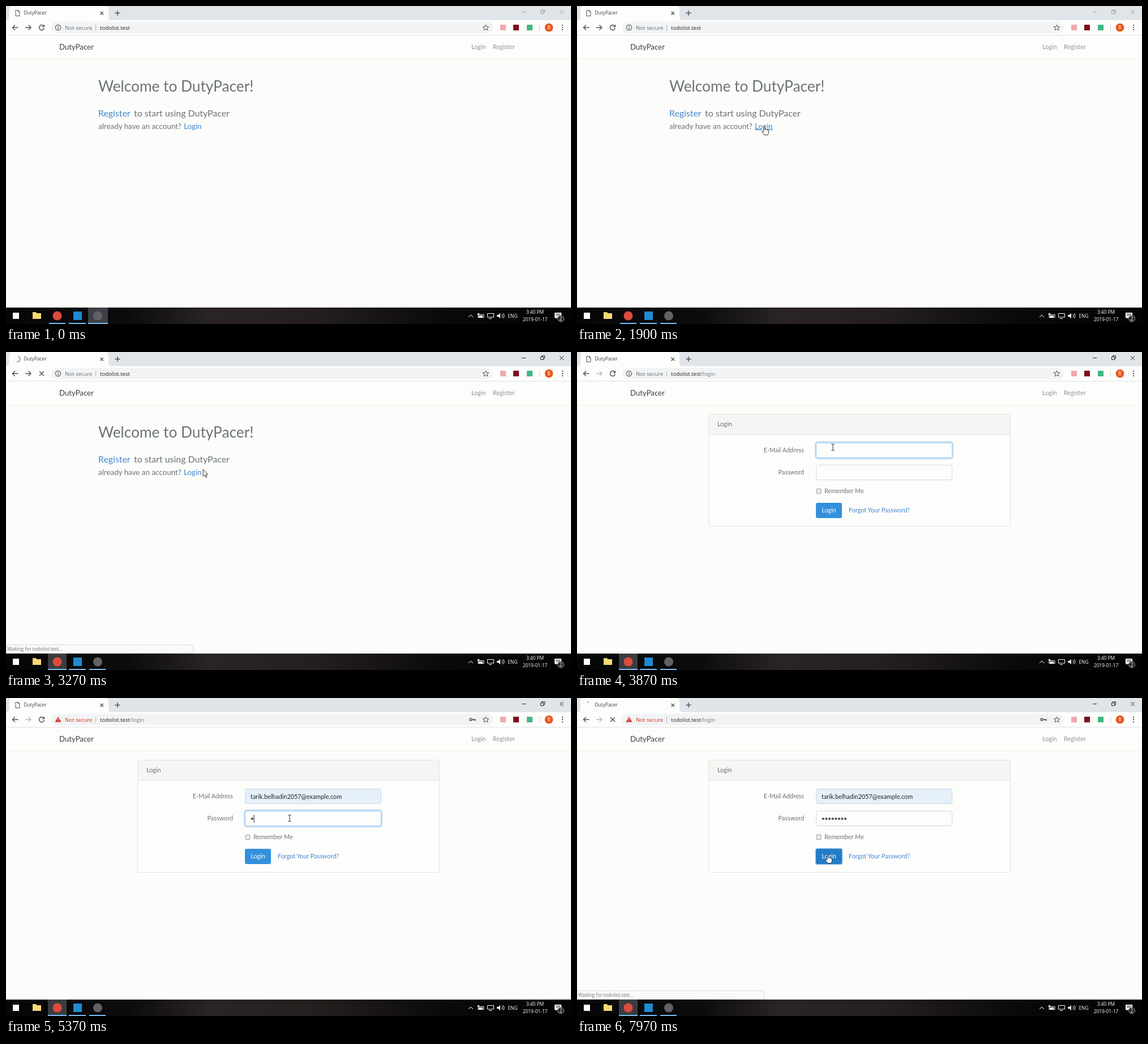
Recreate the animation shown at these times as an HTML page. Size 998x561 px, loop 8000 ms.

```html
<!DOCTYPE html>
<html lang="en">
<head>
<meta charset="utf-8">
<title>DutyPacer</title>
<style>
html, body { margin: 0; width: 100%; height: 100%; overflow: hidden; background: #fff; }
svg { display: block; }
text { font: 8.4px "Open Sans", "Noto Sans", sans-serif; fill: #3c4043; }
.url text { font-size: 9.6px; }
.page text { font: 10.85px Lato, sans-serif; fill: #6a7276; }
.page .h1 { font-size: 26.25px; }
.page .h4 { font-size: 15.9px; }
.page .h5 { font-size: 13.4px; }
.page .brand { font-size: 13.2px; fill: #3b3f42; }
.page .nav { fill: #8d9295; }
.page .link { fill: #4287cb; }
.page .mail { fill: #222; }
.line { fill: none; stroke: #4d5156; stroke-width: 1.4; }
.thin { fill: none; stroke-width: 1; }
.tray text { fill: #fff; }
</style>
</head>
<body>
<svg width="998" height="561" viewBox="0 0 998 561">
  <defs>
    <linearGradient id="bar">
      <stop offset="0" stop-color="#050607"/><stop offset=".22" stop-color="#0d0c0c"/>
      <stop offset=".36" stop-color="#2a2424"/><stop offset=".55" stop-color="#241f1e"/>
      <stop offset=".78" stop-color="#0a0909"/><stop offset="1" stop-color="#030303"/>
    </linearGradient>
  </defs>

  <!-- Browser frame -->
  <rect width="998" height="26" fill="#e0e5e9"/>
  <path d="M0 25Q6 25 6 19V6Q6 0 12 0H175Q181 0 181 6V19Q181 25 187 25Z" fill="#fdfdfc"/>
  <rect y="25" width="998" height="27" fill="#fdfdfc"/>
  <path id="file" d="M17 7.5H21.500L24 10V17.500H17ZM21.500 7.500V10H24" class="line" style="stroke-width:1"/>
  <path id="spin" class="line" style="stroke:#85898d"/>
  <text x="31.500" y="15.300">DutyPacer</text>
  <path d="M166.500 10l5.500 5.500m0-5.500l-5.500 5.500M192.500 12.500h9m-4.500-4.500v9" class="line"/>
  <path id="win" d="M911 10.500h7M944.500 8.500h5v5h-5zM946.500 8.500v-2h5v5h-2M978 7l7 7m0-7l-7 7" class="thin"/>
  <path d="M21.500 38H11.500m4.500-4.500L11.500 38l4.500 4.500" class="line"/>
  <path id="fwd" d="M34 38H44m-4.500-4.500L44 38l-4.500 4.500" class="line"/>
  <path id="reload" d="M66.500 35A4.500 4.500 0 1 0 67.500 39M67.500 33V36.500H64" class="line"/>
  <path id="stop" d="M59 34l8 8m0-8l-8 8" class="line"/>
  <rect x="80" y="28" width="780" height="20" rx="10" fill="#f1f3f4"/>
  <g class="url">
    <g id="info"><circle cx="92" cy="38" r="4.600" class="line" style="stroke-width:1.1"/><path d="M92 37.500v3M92 35v1.200" class="line"/></g>
    <g id="warn"><path d="M92 33L97.500 42.500H86.500Z" fill="#d93025"/><path d="M92 36.300v2.700M92 40v1.200" stroke="#fff"/></g>
    <text id="secure" x="104" y="41.500">Not secure</text>
    <path d="M158.500 33v11" stroke="#b5b8bb"/>
    <text x="166" y="41.500" style="fill:#202124">todolist.test<tspan id="path" fill="#70757a">/login</tspan></text>
  </g>
  <g id="key" class="line"><circle cx="821" cy="38" r="2"/><path d="M823 38h6v2.300M826.500 38v2"/></g>
  <path d="M847.500 33l1.500 3.400 3.700.3-2.800 2.400.9 3.600-3.300-1.900-3.300 1.900.9-3.600-2.800-2.400 3.700-.3z" class="line" style="stroke-width:1"/>
  <rect x="873" y="33" width="10" height="10" fill="#eeaaaa"/>
  <rect x="896" y="33" width="10" height="10" fill="#7d0d1c"/>
  <rect x="920" y="33" width="10" height="10" fill="#41b883"/>
  <path d="M942.500 33v11" stroke="#c9ccd0"/>
  <circle cx="959" cy="38" r="7.300" fill="#ea5417"/>
  <text x="959" y="41.200" text-anchor="middle" style="fill:#fff">B</text>
  <path d="M983 33v2m0 2v2m0 2v2" stroke="#4d5156" stroke-width="2"/>

  <!-- Web page -->
  <g class="page">
    <rect y="51" width="998" height="481" fill="#fcfdfa"/>
    <path d="M0 51.500H998" stroke="#dfe1e2"/>
    <rect y="52" width="998" height="41" fill="#fdfdfc"/>
    <path d="M0 93.500H998" stroke="#f2f2da"/>
    <text x="94" y="76.800" class="brand">DutyPacer</text>
    <text x="822" y="75.500" class="nav">Login</text>
    <text x="860" y="75.500" class="nav">Register</text>

    <g id="welcome">
      <text x="163" y="151" class="h1">Welcome to DutyPacer!</text>
      <text x="163" y="194.500" class="h4 link">Register</text>
      <text x="226" y="194.500" class="h4">to start using DutyPacer</text>
      <text x="163" y="216.500" class="h5">already have an account?</text>
      <text id="link" x="314" y="216.500" class="h5 link">Login</text>
    </g>

    <g id="form">
      <rect x="232.500" y="109.500" width="533" height="198" rx="3" fill="#fdfdfc" stroke="#e1e3dd"/>
      <path d="M233 145V112Q233 110 235 110H763Q765 110 765 112V145Z" fill="#f5f6f3"/>
      <path d="M233 145.500H765" stroke="#e1e3dd"/>
      <text x="248" y="131">Login</text>
      <text x="401" y="177" text-anchor="end">E-Mail Address</text>
      <text x="401" y="215.500" text-anchor="end">Password</text>
      <rect id="glow" x="421.500" width="242" height="29" rx="4" fill="none" stroke="#c6def3" stroke-width="3"/>
      <rect id="mailBox" x="422.500" y="160.500" width="240" height="26" rx="3"/>
      <rect id="passBox" x="422.500" y="199.500" width="240" height="26" rx="3" fill="#fdfdfc"/>
      <text id="mail" x="432" y="177.500" class="mail">tarik.belhadin2057@example.com</text>
      <g id="dots" fill="#495057"></g>
      <path id="caret" stroke="#222"/>
      <rect x="423" y="241.500" width="8" height="8" rx="1" fill="#ececec" stroke="#9a9a9a"/>
      <text x="437" y="249">Remember Me</text>
      <rect id="ring" x="420.500" y="264.500" width="49" height="30" rx="4.500" fill="#a8cdee"/>
      <rect id="button" x="422" y="266" width="46" height="27" rx="3"/>
      <text x="445" y="283" text-anchor="middle" style="fill:#fff">Login</text>
      <text x="480" y="283" class="link">Forgot Your Password?</text>
    </g>
  </g>
  <g id="status">
    <path d="M0 516.500H328Q331 516.500 331 519.500V532H0Z" fill="#fafafa" stroke="#d5d7d8"/>
    <text x="2" y="527.300" style="fill:#6d7175">Waiting for todolist.test...</text>
  </g>

  <!-- Taskbar -->
  <rect y="532" width="998" height="29" fill="url(#bar)"/>
  <rect id="chromeOn" x="74" y="532" width="33" height="29" fill="#3a3c3f"/>
  <rect id="recOn" x="145" y="532" width="35" height="29" fill="#3d4147"/>
  <path d="M76 560h29M111 560h30M147 560h29" stroke="#76b9ed" stroke-width="2"/>
  <path id="chromeLine" d="M74 560h33" stroke="#76b9ed" stroke-width="2"/>
  <path id="recLine" d="M145 560h35" stroke="#76b9ed" stroke-width="2"/>
  <rect x="12" y="541" width="11" height="11" fill="#fff"/>
  <path d="M47 540h6l1.500 2H62v10H47z" fill="#f8d775"/>
  <circle cx="90.500" cy="546.500" r="8" fill="#dd4b3e"/>
  <rect x="119" y="539" width="15" height="15" fill="#1f8ad2"/>
  <circle cx="162" cy="546.500" r="8" fill="#626165"/>
  <g class="tray" stroke="#fff" fill="none">
    <path d="M817 549l4-4 4 4M834 544.500h10v5h-10zM850.500 542.500h11v6.500h-11zM853 551.500h5M876 543.500q2 3 0 6M878.500 542q3 4.500 0 9"/>
    <path d="M835 546h7v3h-7zM833 542h3v3h-3zM867 545h2.500l3.500-3v9l-3.500-3H867zM969 541h12v9h-8l-2 2v-2h-2z" fill="#fff" stroke="none"/>
    <path d="M971 543.500h8M971 546h8" stroke="#222"/>
    <circle cx="980" cy="551.500" r="5.500" fill="#25282b" stroke="#999"/>
    <g stroke="none" text-anchor="middle">
      <text x="895" y="549.500">ENG</text>
      <text x="934.500" y="542.500">3:40 PM</text>
      <text x="934.500" y="555.500">2019-01-17</text>
      <text x="980" y="554.500">2</text>
    </g>
  </g>

  <g id="cursor" stroke-linejoin="round">
    <path id="arrow" d="M0 0V12.500L2.900 9.800 4.900 14.300 6.800 13.400 4.900 9.200H8.800Z" fill="#fff" stroke="#222" stroke-width=".9"/>
    <path id="beam" d="M-2.500-5.500H-.8L0-4.800.8-5.500H2.500M0-4.800V4.800M-2.500 5.500H-.8L0 4.800.8 5.500H2.500" fill="none" stroke="#222"/>
    <path id="hand" d="M-1 1Q0-.5 1 1V6L2.500 5.600 3.300 6.500 5 6.200 5.700 7.200Q7.500 6.800 7.500 8.500V11.500L6 15.500H0L-4 10.500Q-4.500 8.500-2.800 8.800L-1 10Z" fill="#fff" stroke="#222" stroke-width=".9"/>
  </g>
</svg>
<script>
const $ = id => document.getElementById(id);
const show = (id, on) => $(id).style.display = on ? '' : 'none';
const set = (id, attrs) => { for (const k in attrs) $(id).setAttribute(k, attrs[k]); };

const LOOP = 8000, CLICK = 2000, LOADED = 3370, FILLED = 4230, PASSWORD = 4930, SUBMIT = 7870;
const keys = [5300, 5500, 5690, 5900, 6200, 6500, 6770, 6820];
// Pointer stops: time, x, y
const stops = [[300, 1005, 216], [530, 1000, 216], [1320, 332, 227], [1370, 332, 227], [1730, 331, 212],
  [2150, 331, 212], [2600, 348, 207], [3570, 348, 207], [3860, 452, 168], [3930, 452, 168],
  [4220, 478, 204], [4500, 478, 204], [4900, 501, 212], [7330, 501, 212], [7760, 443, 276]];

for (let i = 0; i < keys.length; i++)
  $('dots').innerHTML += `<circle cx="${434.8 + 5.6 * i}" cy="213" r="2.1"/>`;

function pointer(t) {
  const i = stops.findIndex(s => s[0] > t);
  if (i < 0) return stops.at(-1).slice(1);
  if (!i) return stops[0].slice(1);
  const [a, b] = [stops[i - 1], stops[i]];
  const p = (t - a[0]) / (b[0] - a[0]), e = p * p * (3 - 2 * p);
  return [a[1] + (b[1] - a[1]) * e, a[2] + (b[2] - a[2]) * e];
}

function arc(angle, sweep) {
  const at = d => {
    const r = d * Math.PI / 180;
    return `${20 + 5 * Math.cos(r)} ${12.3 + 5 * Math.sin(r)}`;
  };
  return `M${at(angle)}A5 5 0 0 1 ${at(angle + sweep)}`;
}

function draw(t) {
  const onForm = t >= LOADED, filled = t >= FILLED, submitted = t >= SUBMIT;
  const active = t >= CLICK, loading = active && !onForm || submitted;
  const typed = keys.filter(k => k <= t).length;

  show('welcome', !onForm);
  show('form', onForm);
  show('path', onForm);
  for (const id of ['spin', 'stop', 'status']) show(id, loading);
  for (const id of ['file', 'reload']) show(id, !loading);
  if (loading) {
    const turn = (t - (submitted ? SUBMIT : CLICK)) * 360 / 1320;
    set('spin', { d: arc(-90 - turn, Math.min(turn, 179.9)) });
  }
  $('fwd').style.stroke = onForm ? '#b8babd' : '';
  set('win', { stroke: active ? '#222' : '#999da1' });
  for (const id of ['chromeOn', 'chromeLine']) show(id, active);
  for (const id of ['recOn', 'recLine']) show(id, t < 530);

  show('info', !typed);
  show('warn', typed);
  show('key', typed);
  $('secure').style.fill = typed ? '#d93025' : '#6a6e73';

  const inMail = t < PASSWORD, inPass = !inMail && !submitted;
  show('glow', inMail || inPass);
  set('glow', { y: inMail ? 159 : 198 });
  set('mailBox', { fill: filled ? '#e6f0fa' : '#fdfdfc', stroke: inMail ? '#a1cbef' : '#ccd6dd' });
  set('passBox', { stroke: inPass ? '#a1cbef' : '#d5d9d9' });
  show('mail', filled);
  [...$('dots').children].forEach((dot, i) => dot.style.display = i < typed ? '' : 'none');

  // The caret blinks, restarting at each input
  const since = Math.max(...[LOADED, FILLED, PASSWORD, ...keys].filter(k => k <= t));
  show('caret', !submitted && (t - since) % 1000 < (typed === 8 ? 300 : 500));
  const x = inMail ? (filled ? 432.5 + $('mail').getComputedTextLength() : 432.5) : 432.5 + 5.6 * typed;
  set('caret', { d: `M${x} ${inMail ? 167 : 206}v14` });

  const [px, py] = pointer(t);
  const over = (x0, y0, x1, y1) => px >= x0 && px <= x1 && py >= y0 && py <= y1;
  const beam = onForm && (over(422, 160, 663, 187) || over(422, 199, 663, 226));
  const hot = onForm ? over(422, 266, 468, 293) : over(314, 204, 346, 220);
  set('cursor', { transform: `translate(${px} ${py})` });
  show('beam', beam);
  show('hand', hot);
  show('arrow', !beam && !hot);
  $('link').style.textDecoration = hot ? 'underline' : '';
  set('button', { fill: onForm && hot ? '#227dc7' : '#3490dc' });
  show('ring', submitted);
}

function tick() {
  draw(performance.now() % LOOP);
  requestAnimationFrame(tick);
}
tick();
</script>
</body>
</html>
```
